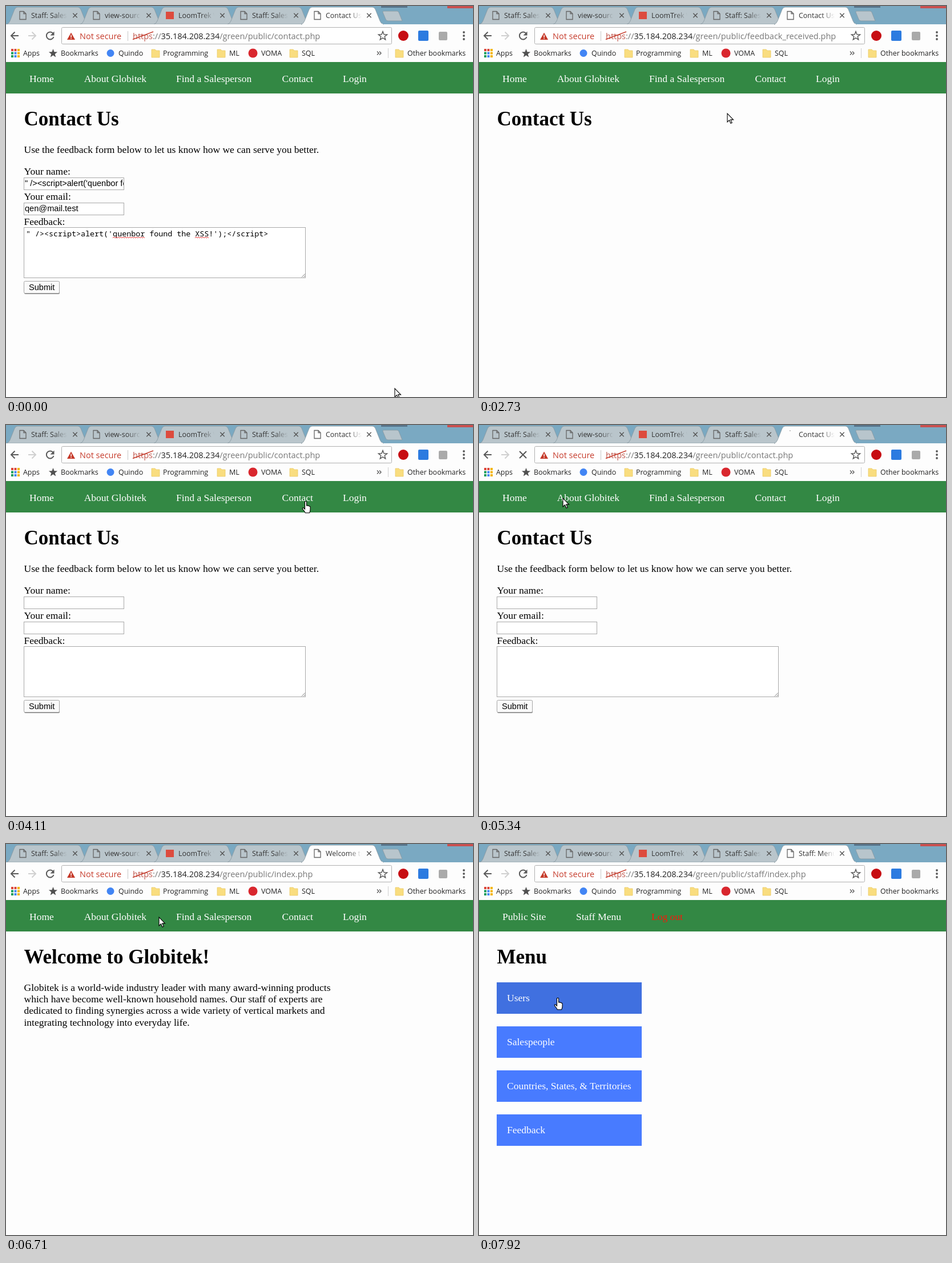
Write an HTML page that moves like this. It is 818x684 px and loops after 8000 ms.

```html
<!DOCTYPE html>
<html lang="en">
<head>
<meta charset="utf-8">
<title>Contact Us</title>
<style>
  html, body { margin: 0; width: 100%; height: 100%; overflow: hidden; background: #fdfdfd; }
  svg.stage { display: block; width: 100vw; height: 100vh; }
  .serif { font-family: "Liberation Serif", "Times New Roman", serif; }
  .ui { font-family: "Open Sans", "Noto Sans", sans-serif; }
  .sans { font-family: "Liberation Sans", Arial, sans-serif; }
  .mono { font-family: "Noto Sans Mono", monospace; }
  .line { fill: none; stroke: #5a5a5a; stroke-width: 2; }
</style>
</head>
<body>
<svg class="stage" viewBox="0 0 818 684" preserveAspectRatio="none">
  <defs>
    <linearGradient id="fade" gradientUnits="userSpaceOnUse" x1="40" x2="63" y1="0" y2="0">
      <stop offset="0" stop-color="#333"/><stop offset="1" stop-color="#333" stop-opacity="0"/>
    </linearGradient>
  </defs>
  <g id="page"></g>
  <g id="frame"></g>
  <g id="live"></g>
  <path id="pointer" stroke="#000" stroke-width="1.1" fill="#fff"/>
</svg>
<script>
const LOOP = 8000;
const LOADING = 'https://35.184';
const PAPER = '#fdfdfd';
const BODY = 17.5, LEADING = 20.2, INPUT = 14.6;
const $ = id => document.getElementById(id);
const esc = s => s.replace(/&/g, '&amp;').replace(/</g, '&lt;');

// Baselines sit on whole pixels
const text = (x, y, str, size = BODY, cls = 'serif', attrs = '') =>
  `<text x="${x}" y="${Math.round(y)}" font-size="${size}" class="${cls}" ${attrs}>${esc(str)}</text>`;
const rect = (x, y, w, h, fill, attrs = '') =>
  `<rect x="${x}" y="${y}" width="${w}" height="${h}" fill="${fill}" ${attrs}/>`;
const dot = (x, y, r, fill) => `<circle cx="${x}" cy="${y}" r="${r}" fill="${fill}"/>`;
const path = (d, attrs = 'class="line"') => `<path d="${d}" ${attrs}/>`;
const heading = str => text(31.5, 209, str, 2 * BODY, 'serif', 'font-weight="bold"');
const lines = (y, rows) => rows.map((row, i) => text(31.5, y + i * LEADING, row)).join('');

// ---- Browser frame ----
const tabShape = (i, fill) => path(
  `M${1 + 129 * i} 32q4-1 6-6l8-20q2-4 5-4h106q3 0 5 4l8 20q2 5 6 6z`,
  `fill="${fill}" stroke="#8797a0" stroke-width=".8"`);
const docIcon = x => path(`M${x} 9.5h7l4 4v10h-11zM${x + 7} 9.5v4h4`,
  'fill="none" stroke="#666" stroke-width="1.3"');
const tabTitle = (i, str) =>
  `<g transform="translate(${44 + 129 * i})">${text(0, 21, str, 12.45, 'ui', 'fill="url(#fade)"')}</g>`;
const cross = (x, y, r, width) =>
  path(`M${x - r} ${y - r}l${2 * r} ${2 * r}m0 ${-2 * r}l${-2 * r} ${2 * r}`,
    `stroke="#555" stroke-width="${width}"`);
const folder = x => path(`M${x} 76h6l2 2h6v12h-14z`, 'fill="#f9dd7f" stroke="#e8c65c" stroke-width=".7"');
const star = (x, y, r, attrs) => {
  const points = Array.from({ length: 10 }, (_, i) => {
    const a = i * Math.PI / 5, d = i % 2 ? r * .42 : r;
    return `${x + d * Math.sin(a)},${y - d * Math.cos(a)}`;
  });
  return `<polygon points="${points.join(' ')}" ${attrs}/>`;
};

function browserFrame() {
  const titles = ['Staff: Sales', 'view-source', 'LoomTrek W', 'Staff: Sales'];
  const gridColors = ['#db4437', '#db4437', '#f4b400', '#0f9d58', '#4285f4', '#f4b400', '#0f9d58', '#4285f4', '#f4b400'];
  const bookmarks = { Apps: 30, Bookmarks: 96, Quindo: 197, Programming: 275, ML: 391, VOMA: 447, SQL: 518, 'Other bookmarks': 703 };
  return rect(0, 0, 818, 32, '#7aa9c2') + rect(657, 0, 46, 3, '#587389') + rect(773, 0, 45, 4, '#c9504f')
    + path('M661 9h24q2 0 3 2l6 15h-25q-3 0-4-3l-5-12q0-2 1-2z', 'fill="#b8c5cc" stroke="#8797a0" stroke-width=".8"')
    + titles.map((title, i) => tabShape(i, '#b9c5cb') + tabTitle(i, title)
        + (i === 2 ? rect(280, 10, 14, 13, '#dd4b3e') : docIcon(24 + 129 * i))
        + cross(121 + 129 * i, 16.5, 3.7, 1.4)).join('')
    + rect(0, 32, 818, 66, PAPER) + tabShape(4, PAPER) + rect(519, 31, 141, 2, PAPER)
    + cross(636, 16.5, 3.7, 1.4)
    // toolbar
    + path('M22 52h-13m6.500-6.500l-6.500 6.500 6.500 6.500')
    + path('M39 52h13m-6.500-6.500l6.500 6.500-6.500 6.500', 'fill="none" stroke="#d0d0d0" stroke-width="2"')
    + rect(97.5, 37.5, 578, 29, '#fff', 'rx="2" stroke="#b0b0b0"')
    + path('M114 46.500l7 12.500h-14z', 'fill="#c53929"') + rect(113.3, 50.5, 1.5, 4.5, '#fff') + rect(113.3, 56, 1.5, 1.5, '#fff')
    + text(129, 58, 'Not secure', 14.5, 'ui', 'fill="#c53929"') + rect(213, 44, 1, 17, '#c8c8c8')
    + star(660, 52.5, 8, 'fill="none" stroke="#555" stroke-width="1.4"')
    + dot(696, 52, 9, '#c70d12') + rect(722, 43, 18, 18, '#2c7be0', 'rx="2"') + rect(758, 45, 15, 15, '#aaa', 'rx="2"')
    + [46, 52, 58].map(y => dot(802, y, 1.9, '#5a5a5a')).join('')
    // bookmarks
    + gridColors.map((c, i) => rect(9 + i % 3 * 5.5, 75 + (i / 3 | 0) * 5.5, 4, 4, c)).join('')
    + star(82.5, 83, 8, 'fill="#505050"') + dot(183, 82.5, 6.5, '#4285f4') + dot(432.5, 82.5, 8, '#d9272e')
    + [255, 370, 497, 682].map(folder).join('') + rect(669, 74, 1, 17, '#d0d0d0')
    + path('M650 79.500l3 3-3 3m4-6l3 3-3 3', 'fill="none" stroke="#555" stroke-width="1.3"')
    + Object.entries(bookmarks).map(([name, x]) => text(x, 87, name, 12.45, 'ui', 'fill="#222"')).join('');
}

// Title, address, reload/stop button and spinner
function liveFrame({ title, url, arc }) {
  const a = -Math.PI / 2 - arc * 2 * Math.PI;
  const loadingParts = () =>
    path(`M${545.5 + 7 * Math.cos(a)} ${17 + 7 * Math.sin(a)}A7 7 0 0 1 545.500 10`, 'fill="none" stroke="#a5a5a5" stroke-width="2"')
    + cross(77, 52, 6, 2);
  const idleParts = () => docIcon(540)
    + path('M82.500 48a6.500 6.500 0 1 0 1 6') + path('M84.500 44.500v7h-7z', 'fill="#5a5a5a"');
  return tabTitle(4, title) + (arc ? loadingParts() : idleParts())
    + `<text x="222" y="58" font-size="14.5" class="ui" fill="#777"><tspan fill="#c0574c">https</tspan>://<tspan fill="#222">35.184.208.234</tspan>/green/public/${url}</text>`
    + path('M222 58.500L258 45', 'stroke="#c53929" stroke-width="1.6"');
}

// ---- Pages ----
const publicLinks = [['Home', 41, 84], ['About Globitek', 136.7, 246], ['Find a Salesperson', 298, 431], ['Contact', 483.5, 538], ['Login', 590, 632]];
const staffLinks = [['Public Site', 41, 118], ['Staff Menu', 170, 250], ['Log out', 302, 357]];
const linksOf = page => page === 'menu' ? staffLinks : publicLinks;
const nav = page => rect(0, 98, 818, 55, '#338844')
  + linksOf(page).map(([name, x]) => text(x, 133, name, BODY, 'serif', `fill="${name === 'Log out' ? '#ff1408' : '#fff'}"`)).join('');

const inside = (p, x, y, w, h) => p.x >= x && p.x <= x + w && p.y >= y && p.y <= y + h;
const squiggle = (x, n) => path(`M${x} 406` + 'l2-2l2 2'.repeat(n), 'fill="none" stroke="#e33" stroke-width="1"');
const box = (x, y, w, h) => rect(x, y, w, h, '#fff', 'stroke="#a9a9a9"');

function form(filled, { pressed }, p) {
  const script = `" /><script>alert('quenbor found the XSS!');<\/script>`;
  const hover = inside(p, 31, 481, 63, 23);
  const entries = () =>
    `<svg x="33" y="300" width="173" height="22">${text(0, 15, script, INPUT, 'sans')}</svg>`
    + text(33, 359, 'qen@mail.test', INPUT, 'sans')
    + text(35, 403, script, 13.35, 'mono') + squiggle(187, 14) + squiggle(331, 6);
  return heading('Contact Us')
    + text(31.5, 257, 'Use the feedback form below to let us know how we can serve you better.')
    + text(31.5, 295, 'Your name:') + text(31.5, 339, 'Your email:') + text(31.5, 383, 'Feedback:')
    + box(31.5, 300.5, 175, 21) + box(31.5, 344.5, 175, 21) + box(31.5, 387.5, 493, 88)
    + path('M518 474.500l6-6m-2.500 6l2.500-2.500', 'stroke="#777" stroke-width="1"')
    + rect(32, 482, 62, 22, '#8a8a8a', 'rx="2"')
    + rect(31.5, 481.5, 62, 21, pressed ? '#dcdcdc' : '#fafafa', `rx="2" stroke="${hover ? '#777' : '#a5a5a5'}"`)
    + text(40, 497, 'Submit', INPUT, 'sans') + (filled ? entries() : '');
}

function territories() {
  const states = [
    ['Alabama (AL)', 'Tavin Morle'], ['Alaska (AK)', 'Corvel Dashmont'], ['Arizona (AZ)', 'Ilsan Bodrey'],
    ['Arkansas (AR)', 'Marindel Ovask'],
    ['California (CA)', '*Northern California', 'Corvel Dashmont', '*Southern California', 'Nolwyn Cadresk'],
    ['Colorado (CO)']];
  let y = 332.4, out = '';
  for (const [state, ...rows] of states) {
    out += text(31.5, y, state);
    rows.forEach((row, i) => {
      y += LEADING;
      const region = row[0] === '*';
      if (region || i === 0) out += rect(59, Math.round(y) - 6, 5, 5, '#000');
      out += region ? text(75.2, y, row.slice(1))
        : text(75.2, y, row, BODY, 'serif', 'fill="#0000ee" text-decoration="underline"');
    });
    y += LEADING + BODY;
  }
  return heading('Find a Salesperson')
    + text(31.5, 257, 'Use the list below to find a salesperson nearby. We are ready to serve you!')
    + text(31.5, 295, 'UNITED STATES', BODY, 'serif', 'font-weight="bold"') + out
    + rect(803, 98, 15, 586, '#f1f1f1') + rect(805, 117, 13, 143, '#c1c1c1')
    + path('M807 110l4.500-5 4.500 5z', 'fill="#a0a0a0"');
}

function about() {
  return heading('About Globitek')
    + lines(257, [
      'Globitek started as a small company with a different name. Ondravel Grain',
      'Corporation was founded in 1880 by Tobin Falkerud, a wheat farmer in',
      'Western Minnesota. Tobin and his three sons expanded their family business',
      'over the next four decades to become a market leader across a wide number',
      'of agricultural markets.'])
    + lines(375.5, [
      'Beginning in 1925, OnGrain began acquiring a number of competitors to',
      'gain access to key patents. These patents allowed OnGrain to push',
      'aggressively into exciting new markets. The company merged with The O.V.',
      'Tramway and Valve Company in 1940 to become Zuvrel Industries, Inc. The',
      'larger enterprise was one of the first companies listed on the Pell Varns',
      'Mercantile Average.'])
    + lines(514, [
      'In 1981, the company rebranded itself as Globitek. The firm employs over',
      '80,000 people in the United States and another 20,000 across 30 other',
      'countries.'])
    + rect(31, 576, 756, 1, '#9a9a9a') + rect(31, 577, 756, 1, '#eee')
    + text(31.5, 622, 'Headquarters', 1.5 * BODY, 'serif', 'font-weight="bold"')
    + text(31.5, 684, 'New York') + text(210.5, 684, 'London') + text(421.5, 684, 'Hong Kong');
}

const home = () => heading('Welcome to Globitek!') + lines(257, [
  'Globitek is a world-wide industry leader with many award-winning products',
  'which have become well-known household names. Our staff of experts are',
  'dedicated to finding synergies across a wide variety of vertical markets and',
  'integrating technology into everyday life.']);

const menuItems = ['Users', 'Salespeople', 'Countries, States, & Territories', 'Feedback'];
const menuBox = i => [31, 242 + 77 * i, 254, 55];
const menu = (state, p) => heading('Menu') + menuItems.map((item, i) =>
  rect(...menuBox(i), inside(p, ...menuBox(i)) ? '#4070e0' : '#487bff')
  + text(49, 275 + 77 * i, item, BODY, 'serif', 'fill="#fff"')).join('');

const pages = {
  filled: (s, p) => form(true, s, p), blank: (s, p) => form(false, s, p),
  received: () => heading('Contact Us'), territories, about, home, menu
};

// ---- Timeline: each entry changes part of the state ----
const timeline = [
  [0, { page: 'filled', url: 'contact.php', title: 'Contact Us', arc: 0, arrow: false, pressed: false }],
  [1210, { pressed: true }],
  [1360, { pressed: false, arc: .04 }],
  [1520, { url: 'feedback_received.php', title: LOADING, arc: .15 }],
  [1670, { arc: .25 }],
  [1820, { page: 'received', title: 'Contact Us', arc: 0 }],
  [3180, { arc: .04, arrow: true }],
  [3330, { url: 'territories.php', title: LOADING, arc: .1 }],
  [3490, { page: 'territories', title: 'Find a Salesperson', arc: 0, arrow: false }],
  [3960, { url: 'contact.php', title: LOADING, arc: .06, arrow: true }],
  [4110, { page: 'blank', title: 'Contact Us', arc: 0, arrow: false }],
  [5340, { arc: .03, arrow: true }],
  [5490, { url: 'about.php', title: LOADING, arc: .1 }],
  [5640, { page: 'about', title: 'About Globitek', arc: 0, arrow: false }],
  [6260, { url: 'index.php', title: LOADING, arc: .06 }],
  [6410, { page: 'home', title: 'Welcome to Globitek', arc: 0 }],
  [7460, { arc: .03, arrow: true }],
  [7620, { url: 'staff/index.php', title: LOADING, arc: .07 }],
  [7770, { page: 'menu', title: 'Staff: Menu', arc: 0, arrow: false }]
];

// Pointer moves: first step, last step, number of steps, end point, upward bow
const moves = [
  [150, 1060, 7, 72, 489, 0], [1520, 1670, 2, 648, 430, 0], [2130, 3030, 7, 382, 128, 0],
  [3330, 3490, 2, 525, 133, 0], [4580, 5030, 4, 147, 128, 14], [5790, 5790, 1, 66, 126, 0],
  [6560, 7160, 5, 640, 132, 0], [7310, 7310, 1, 622, 130, 0], [7770, 7920, 2, 138, 269, 0]
];
const ARROW = 'M0 0v15l3.500-3.300 2.400 5.600 2.300-1-2.400-5.400h4.700z';
const HAND = 'M-1.500 1q1.500-1.500 3 0v7q1.800-1 2.500 .5q1.800-.8 2.400 .8q1.600-.3 1.600 1.500v4q0 3-1.500 6h-7.200q-1.500-3.500-4.500-6.500q-1.500-2.500 1-2.500l2.700 2.500z';

const stateAt = t => Object.assign({}, ...timeline.filter(([start]) => start <= t).map(e => e[1]));

function pointerAt(t) {
  let x = 681, y = 669;
  for (const [start, end, steps, toX, toY, bow] of moves) {
    if (t < start) break;
    const step = t >= end ? steps : 1 + Math.floor((t - start) / (end - start) * (steps - 1));
    const f = step / steps, eased = f * f * (3 - 2 * f);
    x += (toX - x) * eased;
    y += (toY - y) * eased - bow * Math.sin(Math.PI * f);
  }
  return { x: Math.round(x), y: Math.round(y) };
}

const overLink = (page, p) =>
  linksOf(page).some(([, left, right]) => inside(p, left, 117, right - left, 22))
  || page === 'menu' && menuItems.some((_, i) => inside(p, ...menuBox(i)));

const shown = {};
function show(id, html) {
  if (shown[id] !== html) $(id).innerHTML = shown[id] = html;
}

function draw(now) {
  const t = now % LOOP, state = stateAt(t), p = pointerAt(t);
  show('page', nav(state.page) + pages[state.page](state, p));
  show('live', liveFrame(state));
  $('pointer').setAttribute('d', !state.arrow && overLink(state.page, p) ? HAND : ARROW);
  $('pointer').setAttribute('transform', `translate(${p.x} ${p.y})`);
}

show('frame', browserFrame());
const began = performance.now();
const tick = () => {
  draw(performance.now() - began);
  requestAnimationFrame(tick);
};
tick();
</script>
</body>
</html>
```
